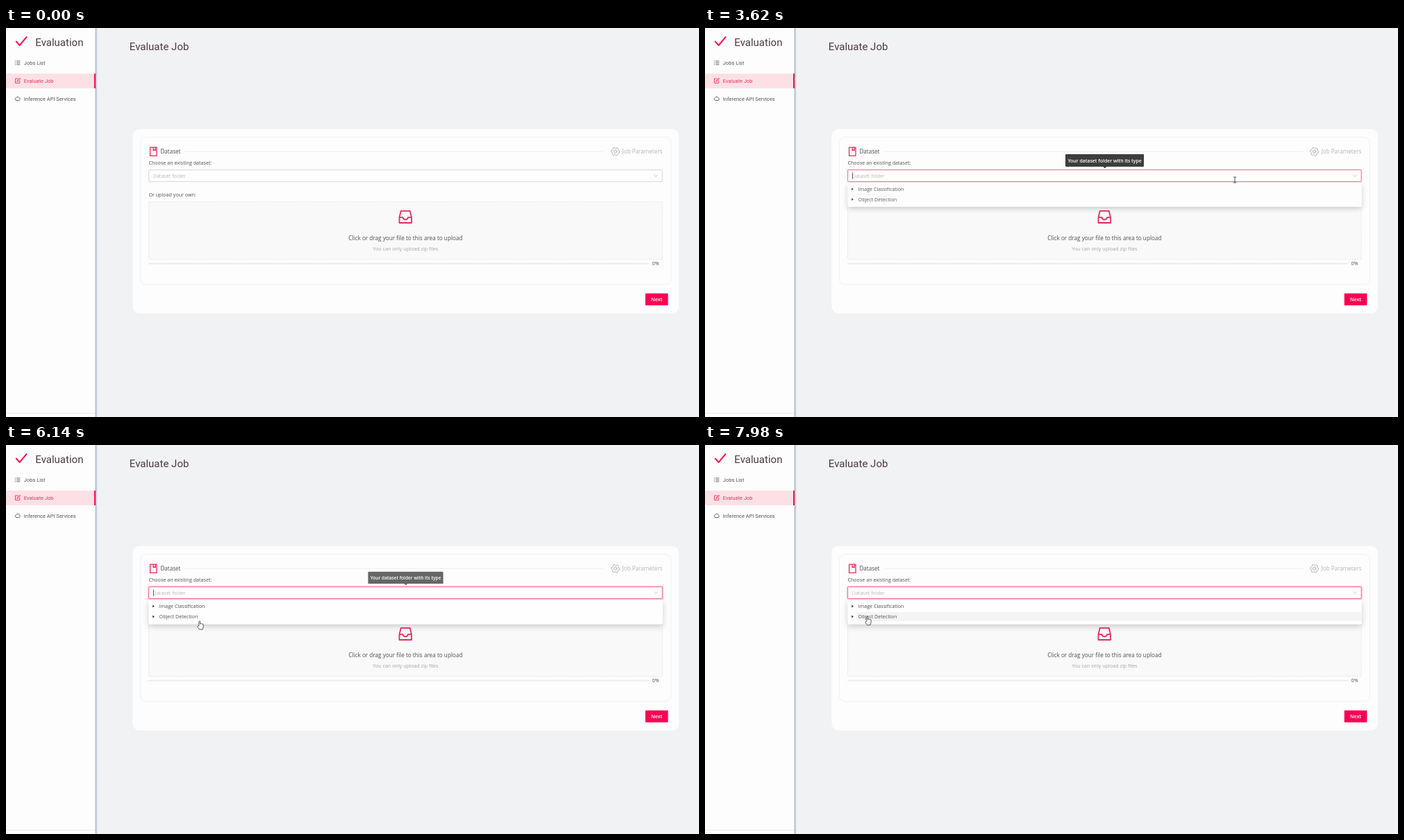
An HTML page that plays this animation: 998 by 561 pixels, repeating every 8 s.

```html
<!DOCTYPE html>
<html lang="en">
<head>
<meta charset="utf-8">
<title>Evaluate Job</title>
<style>
  html, body { margin: 0; width: 100%; height: 100%; overflow: hidden; background: #f1f2f4; }
  svg { display: block; width: 100%; height: 100%; }
  text { font-family: "Open Sans", "Noto Sans", sans-serif; font-size: 7.15px; fill: #505050; }
  .nav text, .title { font-family: Roboto, sans-serif; }
  .nav text { font-size: 7.5px; fill: #555; }
  .nav .title, .title { font-size: 15px; fill: #4e3a40; }
  .step { font-size: 8.1px; }
  .nav .on { fill: #e23458; }
  .mute { fill: #b5b5b5; }
  .bold { font-weight: 600; font-size: 6.9px; fill: #fff; }
  .mid { text-anchor: middle; }
  .ico { fill: none; stroke-linejoin: round; stroke-linecap: round; }
</style>
</head>
<body>
<svg viewBox="0 0 998 561" preserveAspectRatio="none">
  <defs>
    <linearGradient id="edge">
      <stop offset="0" stop-color="#8f9ca5"/>
      <stop offset=".5" stop-color="#c3ccd3"/>
      <stop offset="1" stop-color="#f1f2f4"/>
    </linearGradient>
    <filter id="soft" x="-10%" y="-60%" width="120%" height="260%">
      <feDropShadow dx="0" dy="3" stdDeviation="4" flood-color="#000" flood-opacity=".2"/>
    </filter>
  </defs>

  <rect width="998" height="561" fill="#f1f2f4"/>

  <g class="nav">
    <rect x="128" width="4" height="561" fill="url(#edge)"/>
    <rect width="128.6" height="561" fill="#fdfdfd"/>
    <path d="M0 555.5H128" stroke="#ececec"/>
    <path class="ico" d="M14.8 19.5 19.6 25 29.6 13" stroke="#f5195d" stroke-width="2" />
    <text class="title" x="42.3" y="25.8">Evaluation</text>
    <rect y="65.7" width="128" height="21.3" fill="#fce0e6"/>
    <rect x="127" y="65.7" width="2" height="21.3" fill="#ef1257"/>
    <g class="ico" stroke="#555" stroke-width=".9">
      <path d="M15.6 47.8H20M15.6 50.3H20M15.6 52.8H20M13.3 47.8h.4M13.3 50.3h.4M13.3 52.8h.4"/>
      <path d="M14.6 104.4a1.9 1.9 0 0 1-.1-3.6 2.5 2.5 0 0 1 4.6 0 1.9 1.9 0 0 1-.1 3.6Z"/>
      <path stroke="#e23458" d="M17 73h-3.5v6.4h6.2v-3.2M16 77l.3-1.4 3.5-3.4.9.9-3.4 3.5Z"/>
    </g>
    <text x="25.8" y="53.1">Jobs List</text>
    <text class="on" x="25.8" y="78.9">Evaluate Job</text>
    <text x="25.8" y="104.7">Inference API Services</text>
  </g>

  <text class="title" x="177.8" y="32.3">Evaluate Job</text>
  <rect x="182.5" y="145.7" width="786.5" height="266" rx="10" fill="#fdfdfd"/>
  <rect x="193.5" y="157.5" width="764" height="212.5" rx="8" fill="none" stroke="#f1f1f1"/>

  <g class="ico" stroke="#ea2a5b" stroke-width="1.3">
    <path d="M207.6 172.2h9.4v12.2h-9.4ZM212.2 172.4v4.4l1.5-1.1 1.5 1.1v-4.4"/>
  </g>
  <text class="step" x="222.4" y="181">Dataset</text>
  <path d="M258 178.3H861" stroke="#efefef"/>
  <g class="ico" stroke="#b0b0b0" stroke-width="1">
    <path id="gear"/>
    <circle cx="877.6" cy="178.2" r="2.2"/>
  </g>
  <text class="step mute" x="887.6" y="181">Job Parameters</text>

  <text x="205.4" y="197">Choose an existing dataset:</text>
  <rect id="glow" x="204.9" y="203.9" width="741" height="18.3" rx="2" fill="none" stroke="#ff0055" stroke-width="2"/>
  <rect id="field" x="205.7" y="204.7" width="739.4" height="16.7" rx="1" fill="#fff" stroke-width=".9"/>
  <text class="mute" x="211.7" y="215.7">Dataset folder</text>
  <path class="ico" d="M933.4 211.8 935.8 214.5 938.2 211.8" stroke="#bbb" stroke-width=".8"/>
  <path id="caret" d="M212.4 208.4V218" stroke="#333" stroke-width=".8"/>

  <text x="205.4" y="243.2">Or upload your own:</text>
  <rect x="205.6" y="250.7" width="739.6" height="82.8" rx="1" fill="#f9f9fa" stroke="#d9d9d9" stroke-width=".7" stroke-dasharray="2 1.6"/>
  <path class="ico" d="M566.5 273.5 568.7 264.2H581.8L584 273.5V281.3H566.5ZM566.5 273.5H571.5A3.8 3.8 0 0 0 579 273.5H584" transform="translate(0 -.3)" stroke="#ea2a5b" stroke-width="1.8"/>
  <text class="mid" x="575.4" y="306.3" style="font-size:8.2px">Click or drag your file to this area to upload</text>
  <text class="mid" x="575.4" y="321" style="fill:#a5a5a5;font-size:7.2px">You can only upload zip files</text>
  <path d="M206 339.8H925" stroke="#ececec" stroke-width="2" stroke-linecap="round"/>
  <text x="930.4" y="342.4">0%</text>

  <rect x="920.7" y="382.8" width="32.7" height="17.2" rx="1" fill="#fa0055"/>
  <text class="bold mid" x="937" y="394" style="font-size:7.1px">Next</text>

  <g id="menu">
    <rect x="205.7" y="223.2" width="740" height="35" rx="1" fill="#fefefe" filter="url(#soft)"/>
    <rect id="hover" x="218" y="241" width="727" height="13" fill="#f4f4f4"/>
    <path d="M211.2 230.5l2.6 2-2.6 2ZM211.2 245.5l2.6 2-2.6 2Z" fill="#333"/>
    <text x="220.6" y="235.1">Image Classification</text>
    <text x="220.6" y="250.1">Object Detection</text>
  </g>

  <g id="tip">
    <path d="M520 182H631a1 1 0 0 1 1 1V199a1 1 0 0 1-1 1H578.3L575.8 202.2 573.3 200H520a1 1 0 0 1-1-1V183a1 1 0 0 1 1-1Z" fill="#3d3d3d"/>
    <text class="bold mid" x="575.6" y="193.7">Your dataset folder with its type</text>
  </g>

  <path id="arrow" d="M0 0V10.2L2.4 8 4 11.6 5.6 10.9 4 7.4H7.2Z" fill="#fff" stroke="#333" stroke-width=".7"/>
  <path id="beam" class="ico" d="M-1.8-4H-.5L0-3.6.5-4H1.8M0-3.6V3.6M-1.8 4H-.5L0 3.6.5 4H1.8" stroke="#444" stroke-width=".9"/>
  <path id="hand" d="M-2.2 1V-5.2a.9.9 0 0 1 1.8 0V-1.8a.8.8 0 0 1 1.5-.1 .8.8 0 0 1 1.5.3 .8.8 0 0 1 1.5.5V2.6L3 6H-1.6L-4.1 2.2a.9.9 0 0 1 1.2-1.2Z" fill="#fff" stroke="#333" stroke-width=".8" stroke-linejoin="round"/>
</svg>

<script>
const LOOP = 8000;
const el = Object.fromEntries([...document.querySelectorAll("[id]")].map(n => [n.id, n]));
const clamp = v => Math.min(1, Math.max(0, v));
const ramp = (t, start, span) => clamp((t - start) / span);
const smooth = p => p * p * (3 - 2 * p);
const outQuint = p => 1 - (1 - p) ** 5;
const circ = p => p < .5
  ? (1 - Math.sqrt(1 - 4 * p * p)) / 2
  : (1 + Math.sqrt(1 - (2 - 2 * p) ** 2)) / 2;

// time, x, y of the pointer
const path = [
  [2400, 2, 92], [3200, 768, 219], [3620, 763, 219], [4200, 755, 213],
  [4880, 755, 213], [5640, 340, 217], [6100, 280, 260], [6500, 280, 260],
  [7100, 236, 256], [7400, 236, 256], [7640, 235, 253.6]
];

function pointerAt(t) {
  const i = path.findIndex(k => k[0] > t);
  if (i < 0) return path[path.length - 1].slice(1);
  if (!i) return path[0].slice(1);
  const [t0, x0, y0] = path[i - 1], [t1, x1, y1] = path[i];
  const p = smooth((t - t0) / (t1 - t0));
  return [x0 + (x1 - x0) * p, y0 + (y1 - y0) * p];
}

function scaleAbout(node, x, y, sx, sy, opacity) {
  node.setAttribute("transform", `translate(${x} ${y}) scale(${sx} ${sy}) translate(${-x} ${-y})`);
  node.setAttribute("opacity", opacity);
}

function gearPath(cx, cy) {
  let d = "";
  for (let i = 0; i < 24; i++) {
    const a = i * Math.PI / 12, r = i % 4 < 2 ? 6.1 : 4.8;
    d += `${i ? "L" : "M"}${cx + r * Math.cos(a)} ${cy + r * Math.sin(a)}`;
  }
  return d + "Z";
}

function draw(t) {
  const [x, y] = pointerAt(t);
  const inField = x > 205 && y > 204 && y < 222;
  const shape = t < 2400 ? "" : inField ? "beam" : y > 222 && t > 3540 ? "hand" : "arrow";
  for (const name of ["arrow", "beam", "hand"]) {
    el[name].setAttribute("transform", `translate(${x} ${y})`);
    el[name].setAttribute("visibility", name === shape ? "visible" : "hidden");
  }

  const focus = ramp(t, 3500, 300);
  const lit = t >= 3540 || (t >= 2400 && inField);
  el.field.setAttribute("stroke", lit ? "#f0687f" : "#d2d2d2");
  el.glow.setAttribute("opacity", .22 * focus);
  const caretOn = t >= 3540 && t < 4040 || t >= 5720 && t < 7400;
  el.caret.setAttribute("visibility", caretOn ? "visible" : "hidden");

  const open = outQuint(ramp(t, 3540, 200));
  scaleAbout(el.menu, 575.6, 223, 1, .8 + .2 * open, open);
  el.hover.setAttribute("opacity", ramp(t, 7400, 300));

  const tip = circ(ramp(t, 3300, 100)) - circ(ramp(t, 6100, 100));
  scaleAbout(el.tip, 575.6, 202, .8 + .2 * tip, .8 + .2 * tip, tip);
}

function tick(now) {
  draw(now % LOOP);
  requestAnimationFrame(tick);
}

el.gear.setAttribute("d", gearPath(877.6, 178.2));
draw(0);
requestAnimationFrame(tick);
</script>
</body>
</html>
```
